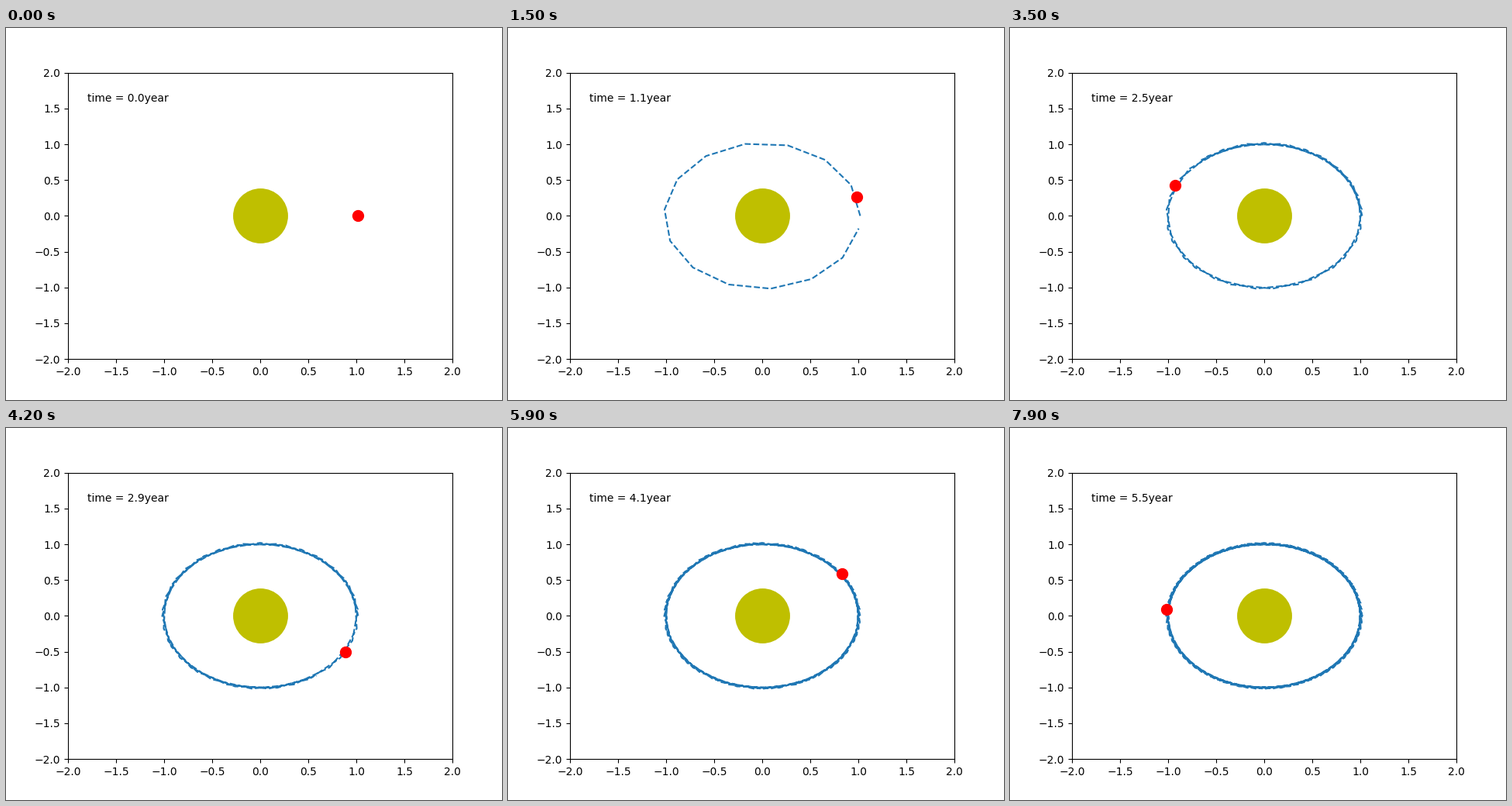
Write a matplotlib script that moves like this. It is 640 by 480 pixels and loops after 8000 ms.

```python
import numpy as np
import matplotlib.pyplot as plt
from matplotlib.animation import FuncAnimation

FRAMES = 80
INTERVAL = 100           # ms
DT = 0.07                # years per step
RADIUS = 1.02            # orbit radius
STEP = np.radians(25.002)  # angle per step

theta = STEP * np.arange(FRAMES)
xs, ys = RADIUS * np.cos(theta), RADIUS * np.sin(theta)

fig, ax = plt.subplots(figsize=(6.4, 4.8), dpi=100)
ax.set_xlim(-2, 2)
ax.set_ylim(-2, 2)

ax.plot([0], [0], "yo", markersize=50)
trail, = ax.plot([], [], "--", color="C0", lw=1.5)
planet, = ax.plot([], [], "ro", markersize=10)
label = ax.text(-1.8, 1.6, "", fontsize=10)


def update(i):
    # the trail stays one step behind the planet
    trail.set_data(xs[:i], ys[:i])
    planet.set_data([xs[i]], [ys[i]])
    label.set_text(f"time = {i * DT:.1f}year")
    return trail, planet, label


anim = FuncAnimation(fig, update, frames=FRAMES, interval=INTERVAL,
                     repeat=True, repeat_delay=0)
plt.show()
```
